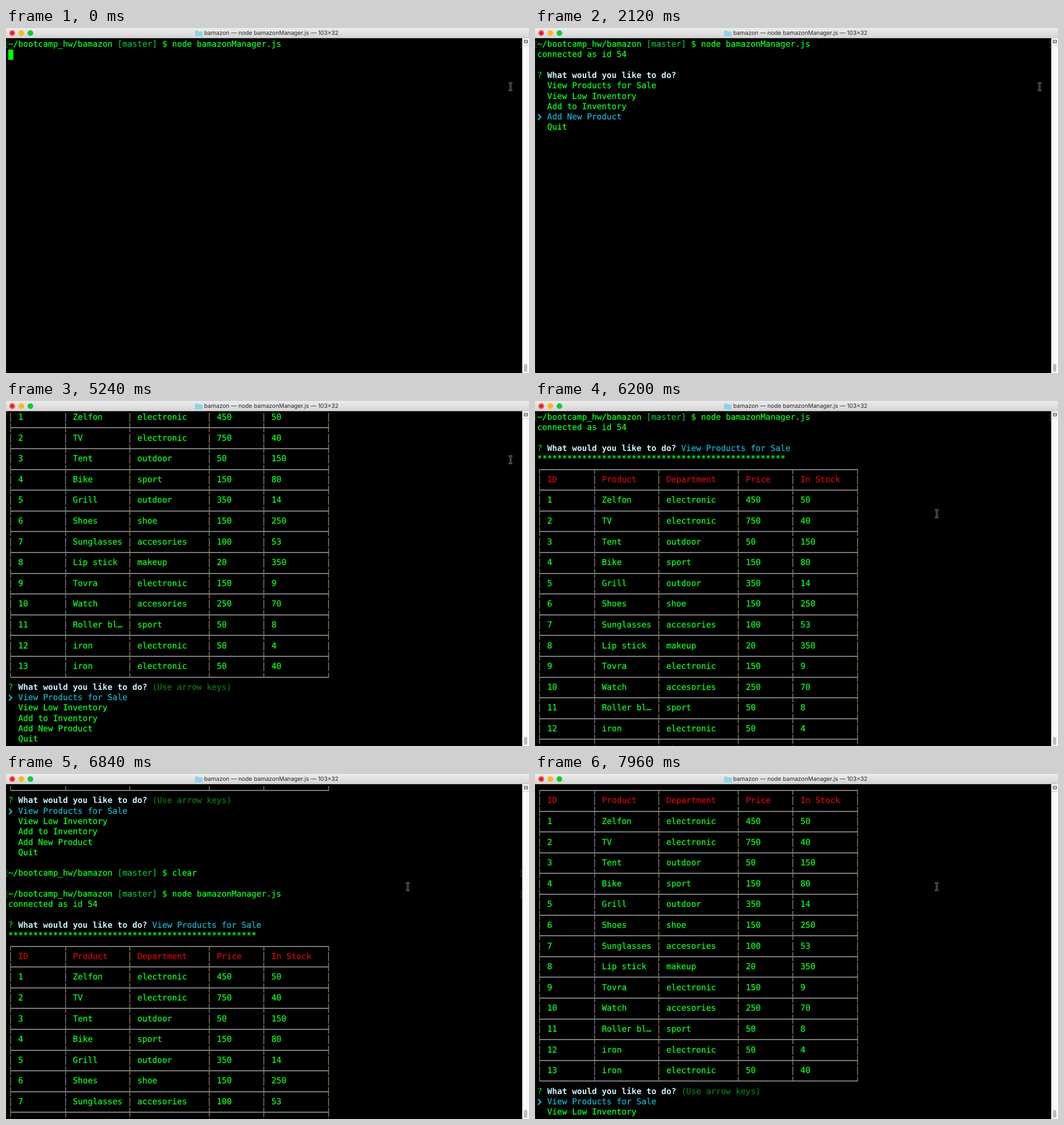
An HTML page for the animation above (8000 ms loop, 921 by 608 pixels).

```html
<!DOCTYPE html>
<html lang="en">
<head>
<meta charset="utf-8">
<title>Terminal session</title>
<style>
html, body { margin: 0; width: 100%; height: 100%; overflow: hidden; background: #000; }
#stage { position: absolute; left: 0; top: 0; width: 921px; height: 608px; overflow: hidden; background: #000; box-shadow: inset 1px 0 #001c04; }
#stage > * { position: absolute; }
#bar { left: 0; top: 0; width: 921px; height: 18px; background: linear-gradient(#ececec, #d4d4d4); box-shadow: inset 0 -1px #c2c2c2; }
#title { position: absolute; left: 349px; top: 0; font: 10.2px/18px Inter, Roboto, sans-serif; text-rendering: geometricPrecision; color: #282828; white-space: pre; }
#bar svg { position: absolute; left: 0; top: 0; }
#view { left: 0; top: 20px; width: 909px; height: 588px; overflow: hidden; }
#buffer { position: absolute; left: 0; top: 0; width: 909px; }
.row {
  position: absolute; left: 4px; width: 905px; height: 18.3px; white-space: pre;
  font: 14.525px/18.3px "DejaVu Sans Mono", "Noto Sans Mono", monospace;
  text-rendering: geometricPrecision; -webkit-text-stroke: .25px; color: #10fc20;
}
.branch { color: #06b83a; }
.ask { color: #c9f2ff; font-weight: 700; -webkit-text-stroke: 0; }
.mark { color: #08c818; }
.hint { color: #087c0c; }
.answer, .on { color: #16b4c8; }
.head { color: #d4080c; }
.edge { position: absolute; top: 3px; width: 2px; height: 10px; border: 1px solid #0a5c12; }
.edge.l { left: -3px; border-right: 0; }
.edge.r { left: 901px; border-left: 0; }
.arrow { position: absolute; left: 0; top: 3px; visibility: hidden; fill: none; stroke: #16b4c8; stroke-width: 2.4; }
.on .arrow { visibility: visible; }
.cell { position: absolute; top: 0; }
.v { position: absolute; top: 1px; width: 2px; height: 16px; background: #665a40; }
.v.cool { background: #5a5a68; }
.top .v { top: 9px; height: 8px; }
.bottom .v { height: 8px; }
.h { position: absolute; left: 4px; top: 8px; width: 561px; height: 2px; background: #7c7c7c; }
#block { position: absolute; left: 0; top: 0; width: 9px; height: 18px; background: #00ff00; }
#scroll { left: 909px; top: 18px; width: 12px; height: 590px; background: #fafafa; box-shadow: inset 1px 0 #e4e4e4; }
#scroll svg { position: absolute; left: 0; top: 0; }
#beam { left: 0; top: 0; overflow: visible; fill: none; }
</style>
</head>
<body>
<div id="stage">
  <div id="bar">
    <svg width="921" height="18">
      <circle cx="11" cy="9" r="5" fill="#fc4144"/>
      <circle cx="11" cy="9" r="1.6" fill="#780808"/>
      <circle cx="27" cy="9" r="5" fill="#f8b824"/>
      <circle cx="43" cy="9" r="5" fill="#12c83c"/>
      <path d="M333 4.5h5l1 1.5h7v8.5h-13z" fill="#8ed2ea"/>
    </svg>
    <div id="title">bamazon — node bamazonManager.js — 103×32</div>
  </div>
  <div id="view"><div id="buffer"></div></div>
  <div id="scroll">
    <svg width="12" height="590">
      <path d="M0 12.5h12" stroke="#d0d0d0"/>
      <path d="M3.5 3.5h6v5h-6zM4 6h5" fill="none" stroke="#484850"/>
      <rect x="3" y="574" width="6" height="14" rx="3" fill="#bdbdbd"/>
    </svg>
  </div>
  <svg id="beam" width="1" height="1">
    <defs><path id="caret" d="M-3-6.5Q0-6.5 0-4Q0-6.5 3-6.5M0-4V4M-3 6.5Q0 6.5 0 4Q0 6.5 3 6.5"/></defs>
    <use href="#caret" stroke="#b4b4b4" stroke-width="2.4"/>
    <use href="#caret" stroke="#000" stroke-width="1.1"/>
  </svg>
</div>
<script>
const LOOP = 8000, PITCH = 18.3, CHAR = 8.745;
const buffer = document.getElementById('buffer');
const beam = document.getElementById('beam');

const OPTIONS = ['View Products for Sale', 'View Low Inventory', 'Add to Inventory', 'Add New Product', 'Quit'];
const COLUMNS = [0, 11, 24, 40, 51, 64];
const HEADER = 'ID,Product,Department,Price,In Stock';
const PRODUCTS = `Zelfon,electronic,450,50
TV,electronic,750,40
Tent,outdoor,50,150
Bike,sport,150,80
Grill,outdoor,350,14
Shoes,shoe,150,250
Sunglasses,accesories,100,53
Lip stick,makeup,20,350
Tovra,electronic,150,9
Watch,accesories,250,70
Roller bl…,sport,50,8
iron,electronic,50,4
iron,electronic,50,40`.split('\n');

const span = (cls, text) => `<span class="${cls}">${text}</span>`;

function group() {
  return buffer.appendChild(document.createElement('div'));
}

function row(parent, line, html, cls = '') {
  const el = document.createElement('div');
  el.className = 'row ' + cls;
  el.style.top = line * PITCH + 'px';
  el.innerHTML = html;
  return parent.appendChild(el);
}

function prompt(parent, line, command) {
  row(parent, line, '<i class="edge l"></i><i class="edge r"></i>~/bootcamp_hw/bamazon ' +
    span('branch', '[master]') + ' $ ' + command);
}

function question(parent, line, tail) {
  return row(parent, line, span('mark', '?') + ' ' + span('ask', 'What would you like to do?') + ' ' + tail);
}

function menu(parent, line) {
  const ask = question(parent, line, span('hint', '(Use arrow keys)'));
  const arrow = '<svg class="arrow" width="9" height="12"><path d="M1.5 1L6 6L1.5 11"/></svg>';
  const items = OPTIONS.map((text, i) => row(parent, line + 1 + i, arrow + '  ' + text, i ? '' : 'on'));
  return { hint: ask.querySelector('.hint'), items };
}

function table(parent, line) {
  const bars = COLUMNS.map((c, i) =>
    `<i class="v${i === 1 || i === 4 ? ' cool' : ''}" style="left:${Math.round((c + .5) * CHAR - 1)}px"></i>`).join('');
  const rule = (at, cls) => row(parent, at, bars + '<i class="h"></i>', cls);
  const records = [HEADER, ...PRODUCTS.map((p, i) => `${i + 1},${p}`)];
  rule(line, 'top');
  records.forEach((record, i) => {
    const cells = record.split(',').map((text, c) =>
      `<span class="cell" style="left:${(COLUMNS[c] + 2) * CHAR}px">${text}</span>`).join('');
    row(parent, line + 1 + 2 * i, bars + cells, i ? '' : 'head');
    rule(line + 2 + 2 * i, i === PRODUCTS.length ? 'bottom' : '');
  });
}

// Line 0 is the prompt that starts the current run.
const history = group();
table(history, -38);
menu(history, -9);
prompt(history, -2, 'clear');
prompt(history, 0, 'node bamazonManager.js');

const waiting = group();
row(waiting, 1, '<i id="block"></i>');

const connected = group();
row(connected, 1, 'connected as id 54');

const choosing = group();
const live = menu(choosing, 3);

const result = group();
question(result, 3, span('answer', OPTIONS[0]));
row(result, 4, '*'.repeat(50));
table(result, 5);
menu(result, 34);

const CONNECT = 400, FIRST_KEY = 1760, ENTER = 4600;
const SELECTION = [[0, 0], [FIRST_KEY, 1], [1900, 2], [2040, 3], [2240, 4], [2960, 3], [3440, 2], [3640, 1], [3840, 0]];
const SCROLL = [[6080, 8], [6240, -3], [6400, -14], [6520, -17], [6700, -14], [7040, -5], [7400, 0], [7960, 5]];

const show = (el, on) => { el.style.visibility = on ? '' : 'hidden'; };
const display = (el, on) => { el.style.display = on ? '' : 'none'; };
const latest = (keys, t) => keys.filter(k => k[0] <= t).pop()[1];

function along(keys, t) {
  const next = keys.findIndex(k => k[0] > t);
  if (next === 0) return keys[0][1];
  if (next < 0) return keys[keys.length - 1][1];
  const [t0, a] = keys[next - 1], [t1, b] = keys[next];
  return a + (b - a) * (t - t0) / (t1 - t0);
}

function draw(t) {
  display(waiting, t < CONNECT);
  display(connected, t >= CONNECT);
  display(choosing, t >= CONNECT && t < ENTER);
  display(result, t >= ENTER);

  const selected = latest(SELECTION, t);
  live.items.forEach((el, i) => el.classList.toggle('on', i === selected));
  show(live.hint, t < FIRST_KEY);

  const top = t < ENTER ? 0 : Math.round(along(SCROLL, t));
  buffer.style.top = -top * PITCH + 'px';

  const u = Math.min(1, Math.max(0, (t - 5480) / 440));
  const glide = u * u * (3 - 2 * u);
  beam.style.transform = `translate(${888.5 - 181 * glide}px, ${103.5 + 95 * glide}px)`;
}

function tick() {
  draw(performance.now() % LOOP);
  requestAnimationFrame(tick);
}
tick();
</script>
</body>
</html>
```
